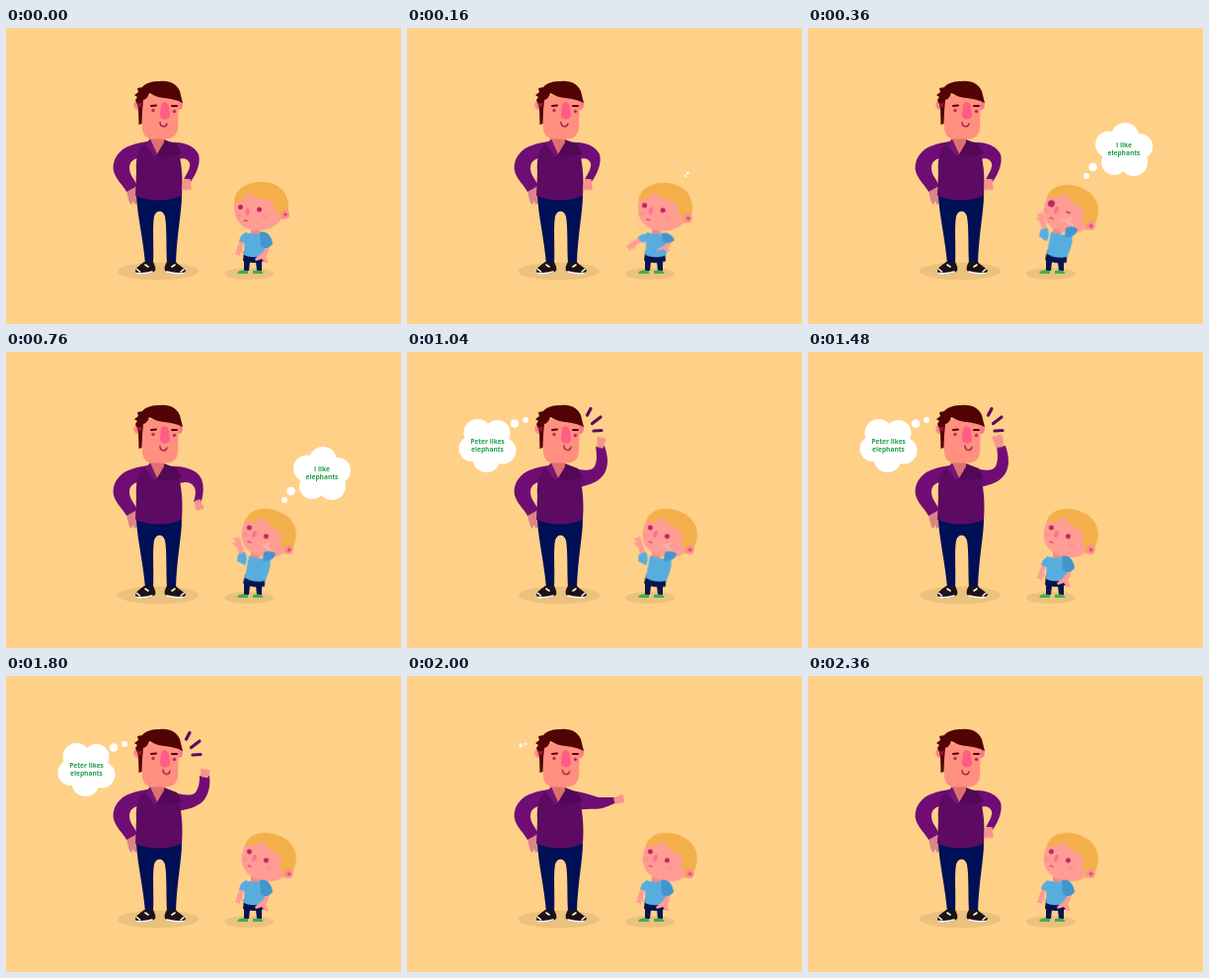
Recreate the animation shown at these times as an HTML page. Size 400 by 300 pixels, loop 2960 ms.

```html
<!DOCTYPE html>
<html lang="en">
<head>
<meta charset="utf-8">
<title>Thinking together</title>
<style>
  html, body { margin: 0; width: 100%; height: 100%; overflow: hidden; background: #ffd088; }
  svg { display: block; width: 100%; height: 100%; }
  text { font: 700 6.6px "Open Sans", "Noto Sans", sans-serif; fill: #22a04c; text-anchor: middle; }

  .anim { animation: 2.96s ease-in-out infinite; }

  /* boy */
  #head { transform-origin: 252px 205px; animation-name: tilt; }
  @keyframes tilt {
    0%, 2.7% { transform: rotate(0); }
    9.5% { transform: rotate(21.5deg); }
    13%, 100% { transform: rotate(20deg); }
  }
  #eyeL { transform-origin: 237.5px 181.5px; animation-name: blinkL; }
  @keyframes blinkL {
    0%, 5.4% { transform: scale(1); }
    8.1% { transform: scale(1.1, .15); }
    10.8%, 13.5% { transform: scale(1.4); }
    17.5%, 42% { transform: scale(1); }
    43.3% { transform: scale(1.1, .15); }
    45%, 63.5% { transform: scale(1); }
    65% { transform: scale(1.1, .15); }
    66.5%, 100% { transform: scale(1); }
  }
  #eyeR { transform-origin: 256.5px 184px; animation-name: blinkR; }
  @keyframes blinkR {
    0%, 5.4% { transform: scale(1); }
    8.1%, 12.5% { transform: scale(1.1, .3); }
    16%, 42% { transform: scale(1); }
    43.3% { transform: scale(1.1, .15); }
    45%, 63.5% { transform: scale(1); }
    65% { transform: scale(1.1, .15); }
    66.5%, 100% { transform: scale(1); }
  }
  #trunk { transform-origin: 250px 236px; animation-name: lean; }
  @keyframes lean {
    0%, 2.7%, 50%, 100% { transform: rotate(0); }
    10.8%, 40.5% { transform: rotate(8deg); }
  }
  #armL { transform-origin: 241px 211px; animation-name: lift; }
  @keyframes lift {
    0%, 2.7% { transform: rotate(0); }
    10.8% { transform: rotate(150deg) scale(1.2); }
    14%, 40.5% { transform: rotate(142deg) scale(1.2); }
    48% { transform: rotate(-4deg); }
    50%, 100% { transform: rotate(0); }
  }
  #armR { transform-origin: 260px 210px; animation-name: flip; }
  @keyframes flip {
    0%, 2.7% { transform: none; }
    10.8% { transform: translate(3px, 0) scaleY(-.7); }
    14%, 40.5% { transform: translate(3px, 0) scaleY(-.62); }
    48% { transform: scaleY(1.04); }
    50%, 100% { transform: none; }
  }
  #palm { animation-name: palm; }
  @keyframes palm {
    0%, 4% { fill: #ff9c94; }
    9%, 41.5% { fill: #ffaca3; }
    46%, 100% { fill: #ff9c94; }
  }

  /* thought bubbles */
  .boyDot { transform-origin: 282px 150px; animation-name: boyDot; }
  @keyframes boyDot {
    0%, 4% { transform: scale(0); }
    7.5%, 28.4% { transform: scale(1); }
    31%, 100% { transform: scale(0); }
  }
  #boyCloud { transform-origin: 290px 142px; animation-name: boyCloud; }
  @keyframes boyCloud {
    0%, 6.7% { transform: scale(0); }
    11.5%, 27% { transform: scale(1); }
    30%, 100% { transform: scale(0); }
  }
  .manDot { transform-origin: 120px 69px; animation-name: manDot; }
  @keyframes manDot {
    0%, 27% { transform: scale(0); }
    30%, 66% { transform: scale(1); }
    69%, 100% { transform: scale(0); }
  }
  #manCloud { transform-origin: 110px 73px; animation-name: manCloud; }
  @keyframes manCloud {
    0%, 29.5% { transform: scale(0); }
    34.5%, 62% { transform: scale(1); }
    67%, 100% { transform: scale(0); }
  }

  /* man */
  #sleeve { animation-name: sleeve; }
  @keyframes sleeve {
    0%, 21.6%, 79.7%, 100% { d: path("M164 116C180 115 190 119 195 128C198 138 191 150 187 156L180 153C184 147 187 141 186 137C184 132 179 131 173 134Z"); }
    25.7%, 75% { d: path("M164 116C180 115 192 119 197 127C201 134 200 144 198 151L190 152C192 146 193 140 190 136C187 131 180 131 173 134Z"); }
    29%, 69% { d: path("M164 116C178 116 188 121 194 124C202 125 208 127 213 129L211 136C203 137 194 138 188 136C182 135 178 134 173 136Z"); }
    32%, 65% { d: path("M164 116C176 119 186 123 193 120C197 117 201 111 203 105L211 108C210 117 206 127 199 131C190 135 182 136 173 137Z"); }
    35.1%, 56.8% { d: path("M164 116C176 120 186 122 190 116C193 110 192 102 191 96L200 95C203 104 205 114 200 123C195 131 186 135 173 137Z"); }
    60.8% { d: path("M164 116C176 120 187 123 192 118C196 112 196 106 196 101L206 101C207 109 206 118 201 125C196 132 186 135 173 137Z"); }
  }
  #hand { animation-name: hand; }
  @keyframes hand {
    0%, 21.6%, 79.7%, 100% { transform: translate(183.5px, 154px) rotate(185deg); }
    25.7%, 75% { transform: translate(194px, 151px) rotate(165deg) scale(.9); }
    29%, 69% { transform: translate(212px, 133px) rotate(90deg) scale(.9); }
    32%, 65% { transform: translate(207px, 107px) rotate(30deg) scale(.9); }
    35.1% { transform: translate(195.5px, 96px) rotate(12deg) scale(.95); }
    39.2%, 56.8% { transform: translate(194px, 95.5px) rotate(-12deg) scale(1.12); }
    60.8% { transform: translate(201px, 102px) rotate(8deg) scale(1.05, .75); }
  }
  #smile { animation-name: smile; }
  @keyframes smile {
    0%, 25.7%, 75%, 100% { transform: translate(0, 0); }
    35.1%, 60.8% { transform: translate(3px, -.5px); }
  }
  #manEyes { transform-origin: 160px 84px; animation-name: manBlink; }
  @keyframes manBlink {
    0%, 27% { transform: scaleY(1); }
    29% { transform: scaleY(.2); }
    31%, 75.7% { transform: scaleY(1); }
    77% { transform: scaleY(.2); }
    79%, 100% { transform: scaleY(1); }
  }
  #sparks { stroke-dasharray: 1 2; animation-name: spark; }
  @keyframes spark {
    0%, 32% { stroke-dashoffset: 1; opacity: 0; }
    32.1% { stroke-dashoffset: 1; opacity: 1; }
    35.1%, 60.8% { stroke-dashoffset: 0; opacity: 1; }
    64.8% { stroke-dashoffset: -1; opacity: 1; }
    64.9%, 100% { stroke-dashoffset: -1; opacity: 0; }
  }
</style>
</head>
<body>
<svg viewBox="0 0 400 300">
  <defs>
    <g id="cloud" fill="#fff">
      <ellipse rx="22" ry="20"/>
      <circle cx="1" cy="-13" r="14"/>
      <circle cx="16" cy="-3" r="13"/>
      <circle cx="10" cy="13" r="14"/>
      <circle cx="-10" cy="13" r="13"/>
      <circle cx="-15.500" cy="-5" r="13.500"/>
    </g>
  </defs>

  <g fill="#ebc17e">
    <ellipse cx="154" cy="246.500" rx="41" ry="9"/>
    <ellipse cx="246" cy="249" rx="25" ry="6"/>
  </g>

  <g id="man">
    <path fill="#dc8587" d="M122 164l9-3 3 9-1 7-3 2-1-4-2 4-2-2-2-7z"/>
    <path fill="#001056" d="M132 170H178C178 186 173 208 172 239H163C162 220 163 202 161 191C159 184 152 184 150 191C148 202 150 222 149 239H141C139 214 133 190 132 170Z"/>
    <g fill="#1d1216">
      <path d="M140 237H149C151 241 152 244 151 246C147 250 134 250 131 247C131 243 136 240 140 237Z"/>
      <path d="M163 237H172C175 241 181 243 182 246C181 250 166 250 161 246C160 243 161 240 163 237Z"/>
    </g>
    <path fill="none" stroke="#fff" stroke-width="1.600" stroke-linecap="round" d="M132.500 244.500l3 2.500M133 248.500q8 1 15-1.500M180 244.500l-3 2.500M163 247q8 2.500 16 1.500M141 240l3 2M171 240l-3 2"/>
    <path fill="#700d75" d="M144 115C131 117 122 119 115 126C109 132 107 141 110 148C113 155 119 160 122 166L133 160C130 153 125 149 125 142C125 135 130 132 136 132Z"/>
    <path id="sleeve" class="anim" fill="#700d75" d="M164 116C180 115 190 119 195 128C198 138 191 150 187 156L180 153C184 147 187 141 186 137C184 132 179 131 173 134Z"/>
    <path fill="#5d0b62" d="M143 115C134 120 131 131 132 146L131 170Q155 179 178 170C179 158 179 139 174 124Q170 116 161 114Z"/>
    <path fill="#520857" d="M160 113L173 118L178 128L156 131L152 127Z"/>
    <path fill="#de716f" d="M146 106H160V116L153 128L147 117Z"/>
    <path fill="#771377" d="M146 112L153 128L150 130L141 118Z"/>
    <g id="hand" class="anim">
      <path fill="#f4948d" d="M-3.500 1L-4-5Q-6-9-4-10Q-2-11-1-9Q0-12 2-10Q5-11 4.500-6L3.500 1Z"/>
    </g>

    <circle cx="134.500" cy="78" r="5.300" fill="#ff8a85"/>
    <ellipse cx="175" cy="77.500" rx="4" ry="5.500" fill="#ff7690"/>
    <path fill="#ff907f" d="M136 68H175L174 102C173 109 169 112 162 112.500H149C142 112 139 109 138 102Z"/>
    <path fill="#520304" d="M134.500 98L134 80L131 73L133 70L130 68L134 65L133 61L138 60C142 55 149 54 156 54C166 53 173 57 176 64L179 76C173 73 168 72 161 71C154 71 148 67 145 66C144 70 141 73 139 73L138 84L137.500 97Z"/>
    <path stroke="#a81c45" stroke-width="1.200" d="M133 76l4 4M137 76l-4 4"/>
    <path stroke="#520304" stroke-width="2" stroke-linecap="round" d="M147 79l5-.5M168 79l5 0"/>
    <g id="manEyes" class="anim" fill="#c32659"><circle cx="149" cy="83.500" r="1.700"/><circle cx="170.500" cy="84.500" r="1.700"/></g>
    <path fill="#ff5d85" d="M157 79C157 74 164 74 165 80L166 88C166 94 156 94 156 88Z"/>
    <path id="smile" class="anim" fill="none" stroke="#a81c45" stroke-width="1.400" stroke-linecap="round" d="M156 95.500C156 101 162 101 163 97"/>
    <g id="sparks" class="anim" fill="none" stroke="#5d0b62" stroke-width="3.200" stroke-linecap="round">
      <path pathLength="1" d="M182.500 64L186 57.500"/>
      <path pathLength="1" d="M187.500 72.500L196 66"/>
      <path pathLength="1" d="M189 80L197 79.500"/>
    </g>
  </g>

  <g id="boy">
    <path fill="#081451" d="M241 232H259V246H254L253 237H247L246 246H241Z"/>
    <path fill="#42ae50" d="M234.500 249C234 245 240 245 245 246V249ZM250 249V246C255 245 260 245 260.500 249Z"/>
    <path fill="#f18c88" d="M248 200h9v8q-5 4-9 0z"/>
    <g id="trunk" class="anim">
      <path fill="#081451" d="M241 226H261L262 236Q251 240 240 236Z"/>
      <path fill="#58addf" d="M242 207C249 209 256 209 262 207C267 211 264 221 262 230C255 233 247 233 241 230Z"/>
    </g>
    <g id="head" class="anim">
      <path fill="#ff9c94" d="M231 180C231 168 244 163 257 164C272 165 282 175 281 187C279 199 268 205 254 205C240 205 231 196 231 180Z"/>
      <path fill="#f2af4a" d="M231 177C231 165 242 156 259 156C276 156 287 167 286 183L287 192L283 190L280 195C277 190 272 186 271 180L269 174C261 176 252 171 246 167C243 173 237 177 231 177Z"/>
      <circle cx="282.500" cy="189" r="4.500" fill="#ff8d8d"/>
      <circle cx="283" cy="189" r="1.800" fill="#d94b70"/>
      <g fill="#ff928e"><ellipse cx="236" cy="190" rx="3" ry="2.200"/><ellipse cx="262" cy="191" rx="3.500" ry="2.200"/></g>
      <circle id="eyeL" class="anim" cx="237.500" cy="181.500" r="2.500" fill="#bd265f"/>
      <circle id="eyeR" class="anim" cx="256.500" cy="184" r="2.500" fill="#bd265f"/>
      <ellipse cx="244.500" cy="186" rx="2" ry="3.800" fill="#ff6d90"/>
      <path fill="none" stroke="#bd265f" stroke-linecap="round" d="M241 195.500q2-1.500 3.500 0"/>
    </g>
    <g id="armL" class="anim">
      <path fill="#ff9c94" d="M238 213L242 215L239 223L240 229L237.500 227L237 232L235 230L232 230L234 223Z"/>
      <path fill="#58addf" d="M243 207L246 214L242 218L236 216Q237 210 243 207Z"/>
    </g>
    <g id="armR" class="anim">
      <path id="palm" class="anim" fill="#ff9c94" d="M263 218L268 218L265 228L263 231L266 238L262 238L259 234L253 236L252 234L258 229L262 224Z"/>
      <path fill="#4296cd" d="M257 207C264 205 269 211 270 219C266 224 262 224 258 221Z"/>
    </g>
  </g>

  <g fill="#fff">
    <circle class="anim boyDot" cx="282" cy="150" r="3"/>
    <circle class="anim boyDot" cx="288.500" cy="141" r="4.300"/>
    <circle class="anim manDot" cx="120" cy="69" r="3"/>
    <circle class="anim manDot" cx="109" cy="72.500" r="4.300"/>
  </g>
  <g id="boyCloud" class="anim">
    <use href="#cloud" x="320" y="123"/>
    <text x="320" y="120.500">I like</text>
    <text x="320" y="128.500">elephants</text>
  </g>
  <g id="manCloud" class="anim">
    <use href="#cloud" transform="translate(81.500 95) rotate(180)"/>
    <text x="81.500" y="92.500">Peter likes</text>
    <text x="81.500" y="100.500">elephants</text>
  </g>
</svg>
</body>
</html>
```
